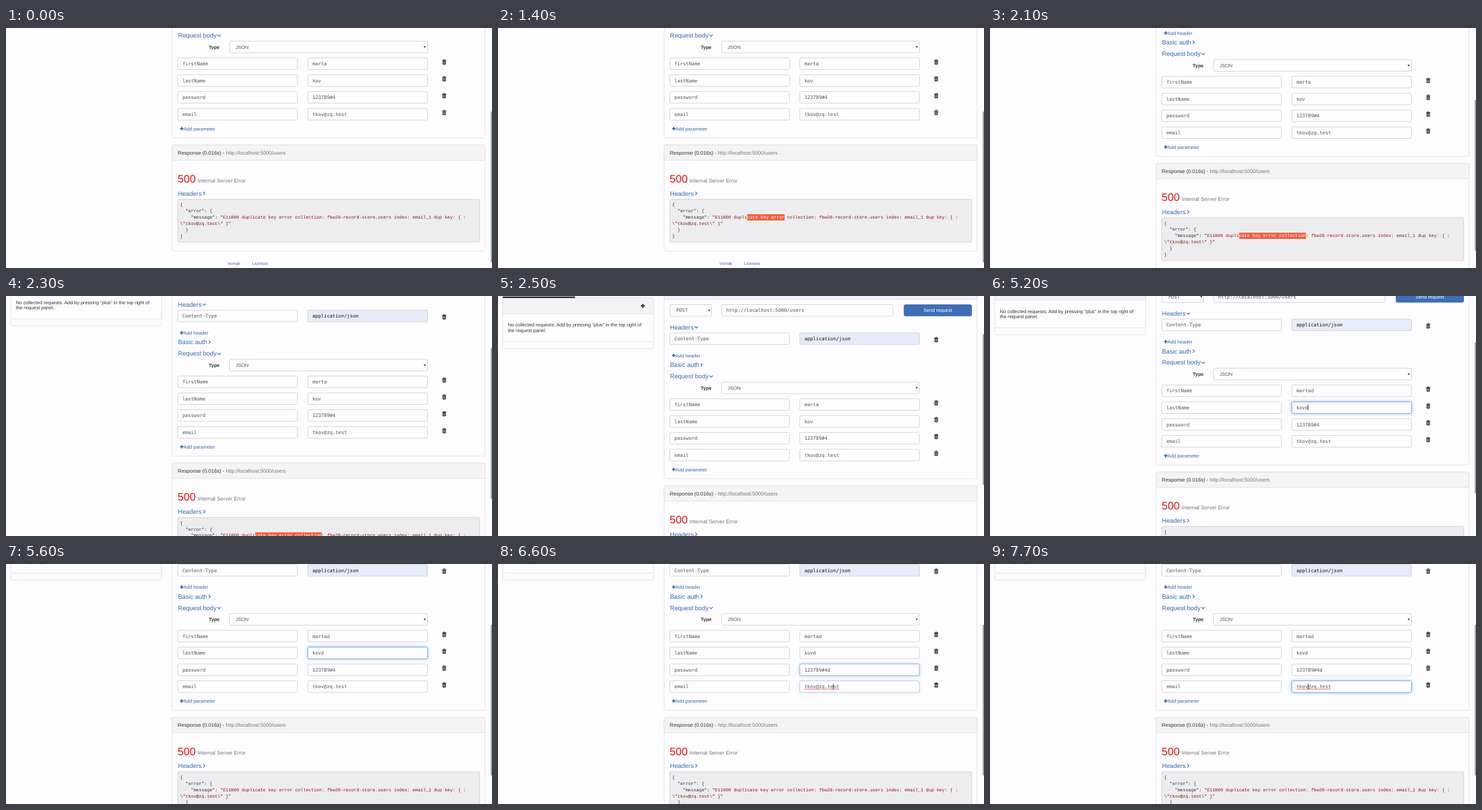
Recreate the animation shown at these times as an HTML page. Size 766 by 379 pixels, loop 8000 ms.

```html
<!DOCTYPE html>
<html lang="en">
<head>
<meta charset="utf-8">
<title>Request form</title>
<style>
html, body { margin: 0; width: 100%; height: 100%; overflow: hidden; background: #fdfcfe; }
svg { display: block; width: 766px; height: 379px; }
text { white-space: pre; text-rendering: geometricPrecision; font-family: "Liberation Sans", Arial, sans-serif; fill: #333; }
.field { font-family: "DejaVu Sans Mono", monospace; fill: #555; }
.code { font-family: "Liberation Mono", "Courier New", monospace; }
.link { fill: #3569b2; }
.muted { fill: #777; }
.red { fill: #8a1214; }
.chevron { fill: none; stroke: #3569b2; stroke-width: 1.1; }
.ring { fill: #fdfcfe; stroke: #66a3e6; filter: drop-shadow(0 0 2.5px rgba(90, 160, 233, .65)); }
</style>
</head>
<body>
<svg viewBox="0 0 766 379"><g id="page"></g><rect id="thumb" x="764" width="2" height="238" fill="#a3a2a5"/></svg>
<script>
const LOOP = 8000, SMALL = 7.57, CODE = 7.03;
const FIELD_CHAR = SMALL * .602, CODE_CHAR = CODE * .6;
const $ = id => document.getElementById(id);

const rect = (x, y, w, h, fill = '#fdfcfe', stroke = '#dddcdf', rx = 2, more = '') =>
  `<rect x="${x}" y="${y}" width="${w}" height="${h}" rx="${rx}" fill="${fill}" stroke="${stroke}" stroke-width=".8" ${more}/>`;
// cy is the middle of the capital letters
const text = (x, cy, s, size = SMALL, cls = '', more = '') =>
  `<text x="${x}" y="${cy + size * .355}" font-size="${size}" class="${cls}" ${more}>${s}</text>`;
const input = (x, cy, w, value, fill, more = '') =>
  rect(x, cy - 9.2, w, 18.4, fill, '#cbcacd') + text(x + 7.2, cy, value, SMALL, 'field', more);
const arrow = (x, y) => `<path d="M${x - 1.8} ${y - 1.2}h3.6l-1.8 2.8z" fill="#333"/>`;
const plus = (x, y, r, fill) =>
  `<path d="M${x - r} ${y}h${2 * r}M${x} ${y - r}v${2 * r}" stroke="${fill}" stroke-width="${r * .62}"/>`;
const heading = (cy, s, chevronX, open) => text(271, cy, s, 9.9, 'link') +
  `<path class="chevron" d="${open ? `M${chevronX} ${cy - 1}l2.6 2.6l2.6 -2.6` : `M${chevronX} ${cy - 2.6}l2.6 2.6l-2.6 2.6`}"/>`;
const addLink = (cy, s) => plus(277, cy - .2, 2.8, '#3569b2') + text(279.8, cy, s, SMALL, 'link');
const trash = cy => `<g transform="translate(690.7 ${cy})">
  <path d="M-1.3 -3v-.8h2.6v.8M-3.4 -2.6h6.8" fill="none" stroke="#333" stroke-width=".9"/>
  <path d="M-2.7 -2.2h5.4v5.3q0 .8 -.8 .8h-3.8q-.8 0 -.8 -.8z" fill="#333"/>
  <path d="M-1.3 -1v3.8M0 -1v3.8M1.3 -1v3.8" stroke="#fdfcfe" stroke-width=".5"/></g>`;

// Body parameters: the focus and typing times drive the animation
const EMAIL = 'tkov@zq.test';
const rows = [
  { name: 'firstName', value: 'marta', focus: 3300, typed: 4000 },
  { name: 'lastName', value: 'kov', focus: 4650, typed: 4950 },
  { name: 'password', value: '123789#4', focus: 5700, typed: 6150 },
  { name: 'email', value: EMAIL, focus: 6550, typed: Infinity }
];
rows.forEach((row, i) => row.y = 171.4 + i * 26.6);

const leftPanel = () =>
  rect(7.5, 3, 237.5, 80) + rect(7.5, 3, 237.5, 25, '#f4f3f5') +
  '<path d="M7.5 72H245" stroke="#dddcdf" stroke-width=".8"/><rect x="7.5" y="0.8" width="114" height="2.4" fill="#29272c"/>' +
  plus(228.3, 15.6, 3.2, '#29272c') +
  text(15.5, 45.7, 'No collected requests. Add by pressing "plus" in the top right of') +
  text(15.5, 54.3, 'the request panel.');

const requestPanel = () =>
  rect(262, -60, 493, 348.7) + rect(262, -60, 493, 65.3, '#f4f3f5') +
  input(271, 22.7, 65.5, 'POST') .replace('x="278.2"', 'x="281"') + arrow(333, 22.7) +
  input(352.5, 22.7, 270.5, 'http://localhost:5000/users') +
  rect(640, 13.8, 106.5, 17.8, '#3e6eb6', '#3562a6') +
  text(693.2, 22.7, 'Send request', SMALL, '', 'text-anchor="middle" style="fill:#fff"') +
  heading(49, 'Headers', 310, true) +
  input(270.7, 67.4, 188.6, 'Content-Type') +
  input(475.7, 67.4, 188.6, 'application/json', '#e7ecfb', 'style="fill:#111"') + trash(69) +
  addLink(94, 'Add header') + heading(108.7, 'Basic auth', 319.5, false) +
  heading(126.6, 'Request body', 333.3, true) +
  text(319.4, 145, 'Type', SMALL, '', 'font-weight="bold"') +
  rect(352.5, 135.8, 312, 18.4, '#fdfcfe', '#cbcacd') +
  text(362, 145, 'JSON', SMALL, '', 'style="fill:#555"') + arrow(660, 145) +
  rows.map((r, i) => input(270.7, r.y, 188.6, r.name) + rect(475.7, r.y - 9.2, 188.6, 18.4, '#fdfcfe', '#cbcacd') +
    rect(475.7, r.y - 9.2, 188.6, 18.4, '', '', 2, `class="ring" id="ring${i}"`) +
    text(482.9, r.y, r.value, SMALL, 'field', `id="value${i}"`) + trash(r.y - 2.6)).join('') +
  `<path id="squiggle" d="M482.9 ${rows[3].y + 4.4}${'l1 -.8l1 .8'.repeat(27)}" fill="none" stroke="#e0383a" stroke-width=".7"/>` +
  '<rect id="caret" width=".8" height="9" fill="#222"/>' +
  addLink(274, 'Add parameter');

const CODE_X = 274.6, CODE_Y = 394, LEAD = 9.85, SELECT_FROM = 28, SELECTED = 'cate key error collection';
const selectX = CODE_X + SELECT_FROM * CODE_CHAR, selectY = CODE_Y + 2 * LEAD;
const red = s => `<tspan class="red">${s}</tspan>`;
const codeLines = [
  '{', '  "error": {',
  '    "message": ' + red(`"E11000 dupli${SELECTED}: fbw28-record-store.users index: email_1 dup key: { :`),
  red(`\\"${EMAIL}\\" }"`), '  }', '}'
];

const responsePanel = () =>
  rect(262, 299.7, 493, 167.5) + rect(262, 299.7, 493, 24.3, '#f4f3f5') +
  text(270.8, 312, 'Response (0.016s) - <tspan class="muted">http://localhost:5000/users</tspan>', 8.1) +
  text(270.6, 353, '500', 17.1, '', 'style="fill:#d81414"') +
  text(302, 356, 'Internal Server Error', 8.4, 'muted') +
  heading(376.3, 'Headers', 311, false) +
  rect(270.7, 385.6, 476, 67.4, '#edecee', '#cccbce') +
  codeLines.map((s, i) => text(CODE_X, CODE_Y + i * LEAD, s, CODE, 'code')).join('') +
  `<rect id="selection" x="${selectX}" y="${selectY - 4.6}" height="9.8" fill="#ee6040"/>` +
  text(selectX, selectY, '', CODE, 'code', 'id="selected" style="fill:#fff"') +
  text(349, 487, 'Vornak', 6.46, 'link') + text(377.4, 487, '·', 6.46) + text(387.8, 487, 'Licenses', 6.46, 'link');

$('page').innerHTML = leftPanel() + requestPanel() + responsePanel();

const clamp = v => Math.max(0, Math.min(1, v));
const ease = (t, start, length) => (1 - Math.cos(Math.PI * clamp((t - start) / length))) / 2;
const TICK = 57.5;

function draw(t) {
  // Two wheel ticks up, later one tick down
  const scroll = TICK * (2 - ease(t, 1980, 240) - ease(t, 2200, 240) + ease(t, 5100, 240));
  $('page').setAttribute('transform', `translate(0 ${-scroll})`);
  $('thumb').setAttribute('y', 60 + scroll * .626);

  const count = t < rows[0].focus ? Math.round(SELECTED.length * clamp((t - 1050) / 650)) : 0;
  $('selection').setAttribute('width', count * CODE_CHAR);
  $('selected').textContent = SELECTED.slice(0, count);

  let active = -1;
  rows.forEach((row, i) => {
    const next = rows[i + 1];
    $('value' + i).textContent = row.value + (t >= row.typed ? 'd' : '');
    $('ring' + i).style.opacity = ease(t, row.focus, 150) * (1 - (next ? ease(t, next.focus, 150) : 0));
    if (t >= row.focus) active = i;
  });

  const caret = $('caret');
  caret.style.opacity = 0;
  $('squiggle').style.opacity = active === 3 ? 1 : 0;
  if (active < 0) return;
  const row = rows[active];
  let column = $('value' + active).textContent.length;
  let touched = t >= row.typed ? row.typed : row.focus;
  if (active === 3) {
    // Clicked near the end, then six presses of the left key
    const presses = Math.max(0, Math.min(6, Math.floor((t - 7100) / 100)));
    column = 10 - presses;
    if (presses) touched = 7100 + presses * 100;
  }
  caret.setAttribute('x', 482.6 + column * FIELD_CHAR);
  caret.setAttribute('y', row.y - 4.7);
  caret.style.opacity = (t - touched) % 1000 < 500 ? 1 : 0;
}

function frame() {
  draw(performance.now() % LOOP);
  requestAnimationFrame(frame);
}
frame();
</script>
</body>
</html>
```
